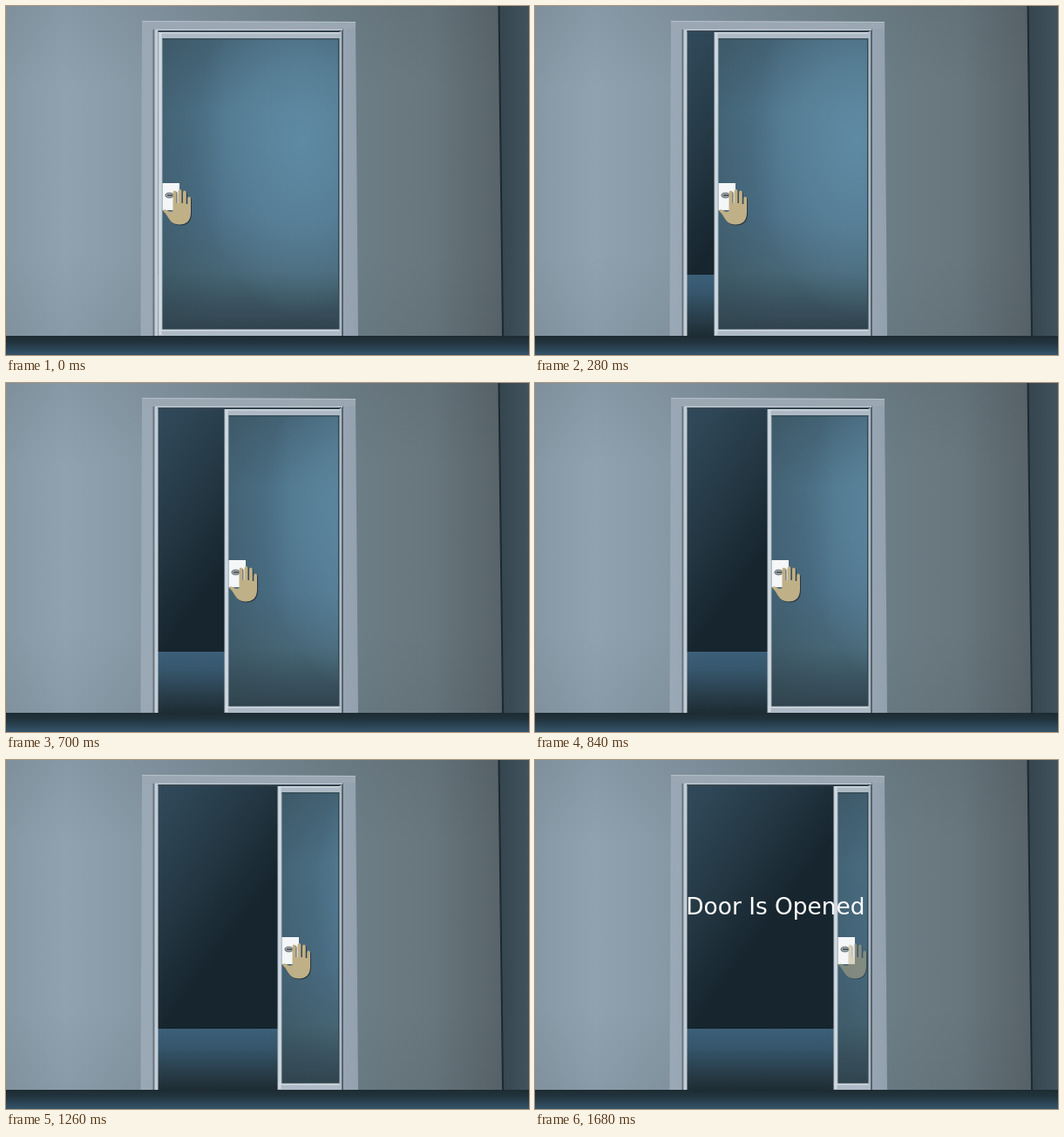
An HTML page that plays this animation: 600x400 px, repeating every 8000 ms.

```html
<!DOCTYPE html>
<html lang="en">
<head>
<meta charset="utf-8">
<title>Sliding door</title>
<style>
  html, body { margin: 0; width: 100%; height: 100%; overflow: hidden; background: #1d2b33; }
  svg { display: block; width: 600px; height: 400px; }
  text { font: 26.4px "DejaVu Sans", sans-serif; fill: #fff; }
</style>
</head>
<body>
<svg viewBox="0 0 600 400">
  <defs>
    <linearGradient id="wall" gradientUnits="userSpaceOnUse" x1="0" x2="568" y1="0" y2="0">
      <stop stop-color="#8798a5"/><stop offset=".12" stop-color="#90a2b0"/>
      <stop offset=".28" stop-color="#8798a5"/><stop offset=".5" stop-color="#798a94"/>
      <stop offset=".72" stop-color="#6d7d85"/><stop offset=".86" stop-color="#68767d"/>
      <stop offset="1" stop-color="#586469"/>
    </linearGradient>
    <linearGradient id="wallShade" x2="0" y2="1">
      <stop stop-color="#35414a" stop-opacity=".1"/><stop offset=".25" stop-color="#35414a" stop-opacity="0"/>
      <stop offset=".75" stop-color="#35414a" stop-opacity="0"/><stop offset="1" stop-color="#35414a" stop-opacity=".08"/>
    </linearGradient>
    <linearGradient id="sideWall">
      <stop stop-color="#35454f"/><stop offset="1" stop-color="#41525c"/>
    </linearGradient>
    <linearGradient id="floor" x2="0" y2="1">
      <stop stop-color="#1d2b32"/><stop offset=".35" stop-color="#22343e"/><stop offset="1" stop-color="#34546b"/>
    </linearGradient>
    <linearGradient id="room" gradientUnits="userSpaceOnUse" x1="180" y1="40" x2="308" y2="135">
      <stop stop-color="#30495a"/><stop offset=".5" stop-color="#253945"/><stop offset="1" stop-color="#17252e"/>
    </linearGradient>
    <linearGradient id="roomFloor" x2="0" y2="1">
      <stop stop-color="#3c6079"/><stop offset=".3" stop-color="#36566b"/><stop offset="1" stop-color="#1f2c33"/>
    </linearGradient>
    <linearGradient id="jamb">
      <stop stop-color="#9ba8b5"/><stop offset=".25" stop-color="#94a1af"/>
      <stop offset=".65" stop-color="#abb6c2"/><stop offset="1" stop-color="#93a0ae"/>
    </linearGradient>
    <linearGradient id="glass" x2="0" y2="1">
      <stop stop-color="#446375"/><stop offset=".25" stop-color="#4e748a"/><stop offset=".6" stop-color="#4b6f86"/>
      <stop offset=".8" stop-color="#476676"/><stop offset="1" stop-color="#30434d"/>
    </linearGradient>
    <linearGradient id="glassEdge">
      <stop stop-color="#304650" stop-opacity=".35"/><stop offset=".35" stop-color="#304650" stop-opacity="0"/>
    </linearGradient>
    <radialGradient id="glow" cx=".78" cy=".36" r=".6">
      <stop stop-color="#6592ac" stop-opacity=".75"/><stop offset=".5" stop-color="#6592ac" stop-opacity=".45"/>
      <stop offset="1" stop-color="#6592ac" stop-opacity="0"/>
    </radialGradient>
    <clipPath id="opening"><path d="M174 28H384V378H174z"/></clipPath>
    <path id="palm" d="M180 234.500Q181.500 232.500 184.500 234Q188 237 191.500 235V214Q191.500 211.500 193.500 211.500T195.500 214V226H197.500V212.500Q197.500 210 199.500 210T201.500 212.500V226H203V214Q203 211.500 204.900 211.500T206.800 214V227H208.400V221Q208.400 218.500 210.200 218.500T212 221V237Q211.700 250.500 198.500 250.500Q191 250.500 187 244Q184 238.500 180 234.500z"/>
  </defs>

  <path fill="url(#wall)" d="M0 0H570V378H0z"/>
  <path fill="url(#wallShade)" d="M0 0H570V378H0z"/>
  <path fill="url(#sideWall)" d="M565 0H600V378H570z"/>
  <path stroke="#1c2930" stroke-width="2" d="M565.5 0L570 378"/>
  <path fill="url(#floor)" d="M0 378H600V400H0z"/>

  <path fill="url(#room)" d="M174 28H384V308H174z"/>
  <path fill="url(#roomFloor)" d="M174 308H384V378H174z"/>

  <g clip-path="url(#opening)">
    <g id="door">
      <path fill="#aebac5" d="M174.5 30H384V378H174.5z"/>
      <path fill="#d0d9e0" d="M175 30H384V31.500H175zM175 371H384V372.500H175zM175.500 30H178.500V377H175.500z"/>
      <path fill="url(#glass)" d="M179.5 37H384V370.500H179.5z"/>
      <path fill="url(#glow)" d="M179.5 37H384V370.500H179.5z"/>
      <path fill="url(#glassEdge)" d="M179.5 37H384V370.500H179.5z"/>
      <path fill="#33474f" fill-opacity=".7" d="M179.5 37H384V38.500H179.5z"/>
      <path fill="#f4f6f7" d="M179.5 203H199V234H179.5z"/>
      <ellipse cx="187.5" cy="217" rx="4.5" ry="2.8" fill="#a4abb0" stroke="#59636a"/>
      <path stroke="#3b444a" stroke-width="1.5" d="M185 217H191"/>
    </g>
  </g>

  <path fill="#33474f" d="M381 38H382.500V370H381z"/>
  <path fill="#aebac5" d="M382.500 29H385V378H382.500z"/>
  <path fill="#55646f" d="M385 27H387V378H385z"/>
  <path fill="url(#jamb)" d="M156 17H169V378H154.500zM387 18.500L401 18L404 378H387z"/>
  <path fill="#66747f" d="M168.500 27H170.500V378H168.500z"/>
  <path fill="#c3ccd5" d="M170.500 28H174.500V378H170.500z"/>
  <path fill="#9ba8b4" d="M156 17L401 18V26.500H156z"/>
  <path fill="#b4bfc9" d="M156 17L401 18V19L156 18z"/>
  <path fill="#c3ccd5" d="M170.500 26.500H386V28H170.500z"/>
  <path fill="#3a4852" d="M174.500 28H383V29.500H174.500z"/>

  <g id="hand">
    <use href="#palm" x="1" y="1" fill="#20292e" fill-opacity=".75"/>
    <use href="#palm" fill="#c0b087"/>
  </g>
  <text id="label" x="173.3" y="176.5">Door Is Opened</text>
</svg>
<script>
  const FRAME = 140, LOOP = 8000, LAST = 11, STEP = 15.27;
  const [door, hand, label] = ["door", "hand", "label"].map(id => document.getElementById(id));

  function draw(now) {
    const tick = Math.floor(now % LOOP / FRAME);
    const opened = tick > LAST;
    const slide = `translate(${Math.round(Math.min(tick, LAST) * STEP)} 0)`;
    door.setAttribute("transform", slide);
    hand.setAttribute("transform", slide);
    hand.setAttribute("opacity", opened ? 0.5 : 1);
    label.setAttribute("visibility", opened ? "visible" : "hidden");
  }

  let start;
  function loop(now) {
    start ??= now;
    draw(now - start);
    requestAnimationFrame(loop);
  }
  draw(0);
  requestAnimationFrame(loop);
</script>
</body>
</html>
```
